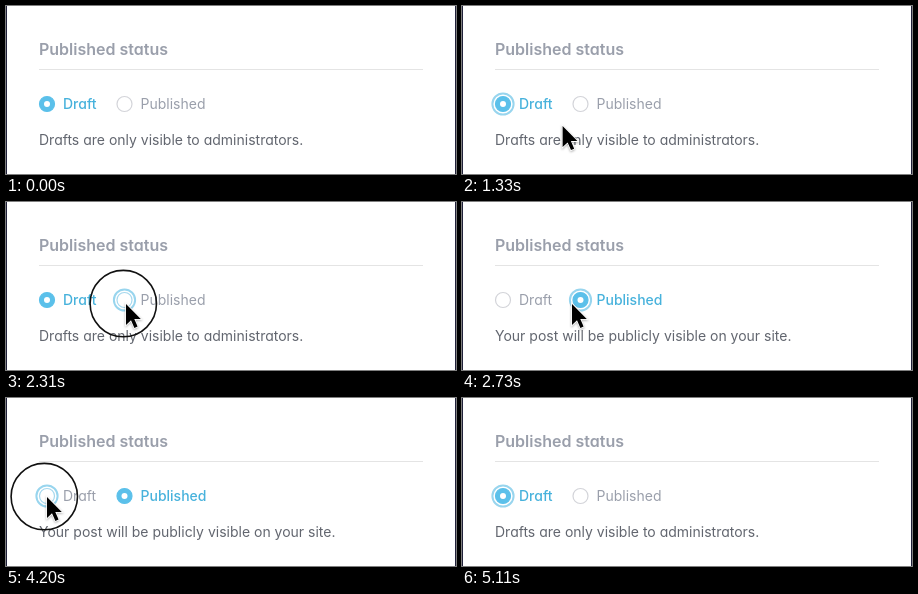
An HTML page for the animation above (5180 ms loop, 450 by 168 pixels).

```html
<!DOCTYPE html>
<html lang="en">
<head>
<meta charset="utf-8">
<title>Published status</title>
<style>
html, body { margin: 0; width: 100%; height: 100%; overflow: hidden; background: #fff; }
svg { display: block; width: 450px; height: 168px; }
text { font: 14px Inter, sans-serif; font-feature-settings: "cv11"; fill: #62666f; }
.title { font-size: 16px; font-weight: 600; fill: #9a9fab; }
.option text { fill: #9a9fab; }
.option.on text { fill: #47b2dc; font-weight: 500; }
.dot { fill: #fff; stroke: #d3d4d9; stroke-width: 1.2; }
.on .dot { fill: #5bc0ea; stroke: #5bc0ea; }
.hole { fill: #fff; }
.ring { fill: none; stroke: #98d5ee; stroke-width: 2; visibility: hidden; }
.focus .ring { visibility: visible; }
.focus:not(.on) .dot { stroke: #a5d8ee; }
#pulse { fill: none; stroke: #111; stroke-width: 1.6; }
.halo { fill: none; stroke: #fff; stroke-width: 4; }
.beam { fill: none; stroke: #111; stroke-width: 1.9; }
.tip { fill: #000; stroke: #fff; stroke-width: 1.6; paint-order: stroke; }
#arrow { filter: drop-shadow(0 1.5px 1.2px rgba(0, 0, 0, .3)); }
</style>
</head>
<body>
<svg viewBox="0 0 450 168">
  <rect width="450" height="168" fill="#fff"/>
  <path d="M.5 0V168M449.5 0V168" stroke="#20213a"/>
  <text class="title" x="33" y="48.5">Published status</text>
  <path d="M33 63.5H417" stroke="#e4e4e4"/>
  <g class="option" id="draft">
    <circle class="ring" cx="41" cy="98" r="10.6"/>
    <circle class="dot" cx="41" cy="98" r="7.5"/>
    <circle class="hole" cx="41" cy="98" r="3"/>
    <text x="57" y="103">Draft</text>
  </g>
  <g class="option" id="published">
    <circle class="ring" cx="118.5" cy="98" r="10.6"/>
    <circle class="dot" cx="118.5" cy="98" r="7.5"/>
    <circle class="hole" cx="118.5" cy="98" r="3"/>
    <text x="134.5" y="103">Published</text>
  </g>
  <text id="note" x="33" y="139"></text>
  <circle id="pulse" r="33.2"/>
  <g id="ibeam">
    <path class="halo" d="M-5-12Q-1-12 0-8Q1-12 5-12M0-8V8M-5 12Q-1 12 0 8Q1 12 5 12M-3 2.5H3"/>
    <path class="beam" d="M-5-12Q-1-12 0-8Q1-12 5-12M0-8V8M-5 12Q-1 12 0 8Q1 12 5 12M-3 2.5H3"/>
  </g>
  <g id="arrow">
    <path class="tip" d="M0 0V21L5 16.3L8.4 24L11.6 22.6L8.3 15H14.8Z"/>
  </g>
</svg>
<script>
const LOOP = 5180, STEP = 70;
const $ = id => document.getElementById(id);
const [draft, published, note, pulse, ibeam, arrow] =
  ['draft', 'published', 'note', 'pulse', 'ibeam', 'arrow'].map($);

// Pointer stops: time, x, y
const path = [
  [910, 131, 125], [980, 140, 126], [1120, 140, 126], [1190, 136, 127],
  [1400, 78, 115], [1540, 35, 105], [1610, 31, 100], [1680, 50, 97],
  [1750, 53, 96], [1960, 85, 90], [2240, 120, 102], [2520, 120, 102],
  [2730, 110, 102], [3080, 46, 102], [3360, 41, 102], [3430, 41, 102],
  [3500, 41, 99], [4620, 41, 99], [5110, 100, 171]
];

const slope = (i, k) => (path[i + 1][k] - path[i][k]) / (path[i + 1][0] - path[i][0]);

// Monotone tangent: zero at rests and turning points
function tangent(i, k) {
  if (i === 0 || i === path.length - 1) return 0;
  const a = slope(i - 1, k), b = slope(i, k);
  return a * b <= 0 ? 0 : 2 * a * b / (a + b);
}

function pointAt(t, k) {
  let i = 0;
  while (i < path.length - 2 && t >= path[i + 1][0]) i++;
  const [p, q] = [path[i], path[i + 1]];
  const d = q[0] - p[0], u = (t - p[0]) / d, v = 1 - u;
  return p[k] * v * v * (1 + 2 * u) + q[k] * u * u * (3 - 2 * u)
    + d * u * v * (v * tangent(i, k) - u * tangent(i + 1, k));
}

const within = (t, from, to) => t >= from && t < to;
const show = (el, on) => el.style.display = on ? '' : 'none';
const place = (el, x, y) => el.setAttribute('transform', `translate(${x.toFixed(2)} ${y.toFixed(2)})`);

function option(el, on, focus) {
  el.classList.toggle('on', on);
  el.classList.toggle('focus', focus);
}

function draw(now) {
  const t = Math.floor((now % LOOP) / STEP) * STEP;
  const live = within(t, 2450, 4340);
  option(draft, !live, within(t, 560, 2310) || t >= 4200);
  option(published, live, within(t, 2310, 4200));
  const copy = live ? 'Your post will be publicly visible on your site.'
    : 'Drafts are only visible to administrators.';
  if (note.textContent !== copy) note.textContent = copy;

  const x = pointAt(t, 1), y = pointAt(t, 2);
  const overText = within(t, 910, 1260);
  show(ibeam, overText);
  show(arrow, within(t, 1260, 5110));
  show(pulse, within(t, 2310, 2450) || within(t, 4200, 4340));
  place(ibeam, x, y);
  place(arrow, x, y);
  place(pulse, x - 2.7, y - 0.4);
}

function tick() {
  draw(performance.now());
  requestAnimationFrame(tick);
}
tick();
</script>
</body>
</html>
```
